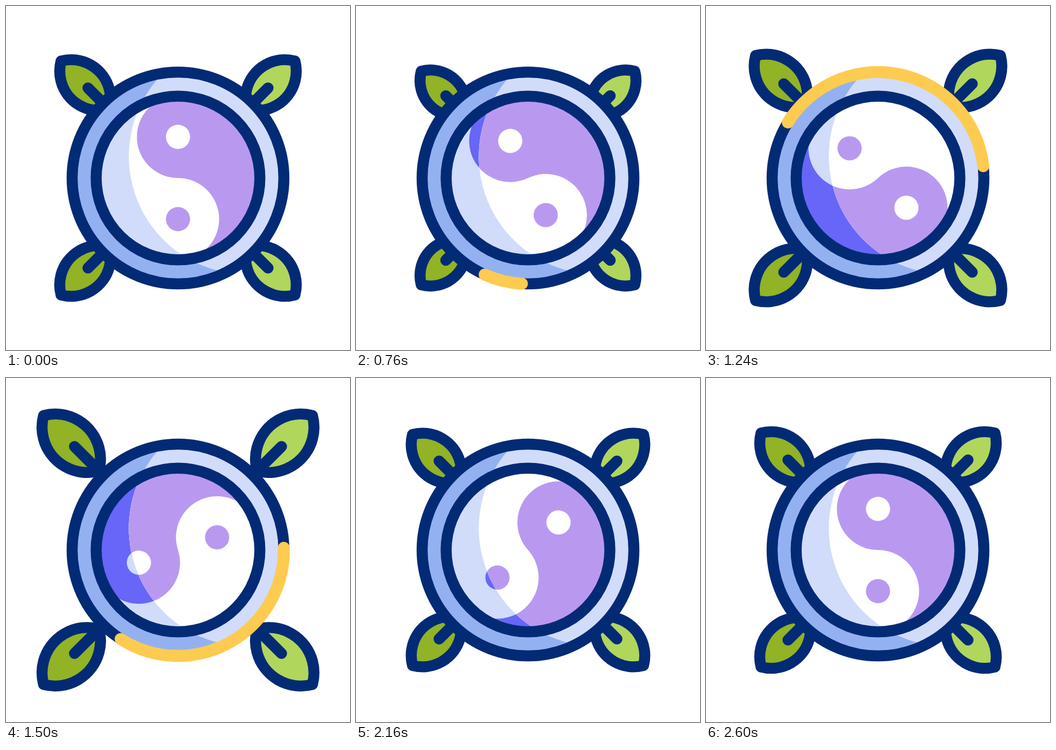
An HTML page with a canvas that plays this animation: 640 px wide and 640 px high, repeating every 3 s.

```html
<!DOCTYPE html>
<html lang="en">
<head>
<meta charset="utf-8">
<title>Yin yang</title>
<style>
  html, body { margin: 0; width: 100%; height: 100%; overflow: hidden; background: #fff; }
  canvas { display: block; width: 640px; height: 640px; }
</style>
</head>
<body>
<canvas id="stage" width="640" height="640"></canvas>
<script>
const ctx = document.getElementById('stage').getContext('2d');
const LOOP = 3000;
const TAU = Math.PI * 2;
const RAD = Math.PI / 180;
const LINE = 20.5;
const NAVY = '#032b75', YELLOW = '#fdcb50';
const SHADE = { rim: '#93b1f1', yang: '#d1dcfa', yin: '#6766f8' };
const LIT = { rim: '#d1dcfa', yang: '#ffffff', yin: '#b999f0' };

// Steps of [time in ms, value], eased in between.
const TRACKS = {
  spin: [[200, 0], [600, -40], [2100, 410], [2600, 360]],
  leaf: [[200, 1], [800, 0.912], [1667, 1.175], [1850, 1.175], [2270, 0.95], [2600, 1]],
  head: [[600, 0], [1700, 360]],
  tail: [[900, 0], [2000, 360]],
  turn: [[600, 180], [2000, 270]]
};

function valueAt(track, t) {
  if (t <= track[0][0]) return track[0][1];
  for (let i = 1; i < track.length; i++) {
    const [t0, a] = track[i - 1], [t1, b] = track[i];
    if (t < t1) {
      const p = (t - t0) / (t1 - t0);
      return a + (b - a) * p * p * (3 - 2 * p);
    }
  }
  return track[track.length - 1][1];
}

function disc(x, y, r, color) {
  ctx.beginPath();
  ctx.arc(x, y, r, 0, TAU);
  ctx.fillStyle = color;
  ctx.fill();
}

function stroke(color, width) {
  ctx.strokeStyle = color;
  ctx.lineWidth = width;
  ctx.stroke();
}

function ring(r) {
  ctx.beginPath();
  ctx.arc(0, 0, r, 0, TAU);
  stroke(NAVY, LINE);
}

// Lens of two arcs on the diagonal; the line width does not scale.
function leaf(sx, sy, scale, color) {
  const tip = -217.5 * scale, base = -127.8 * scale, r = 73.3 * scale;
  const cx = -198.7 * scale, cy = -146.7 * scale;
  const from = Math.atan2(tip - cy, tip - cx), to = Math.atan2(base - cy, base - cx);
  ctx.save();
  ctx.scale(sx, sy);
  ctx.beginPath();
  ctx.arc(cx, cy, r, from, to);
  ctx.arc(cy, cx, r, Math.PI / 2 - to, Math.PI / 2 - from);
  ctx.closePath();
  ctx.fillStyle = color;
  ctx.fill();
  stroke(NAVY, LINE);
  ctx.beginPath();
  ctx.moveTo(-167.5 * scale, -167.5 * scale);
  ctx.lineTo(base, base);
  stroke(NAVY, LINE);
  ctx.restore();
}

function medallion(colors, spin) {
  const R = 153, h = R / 2, q = Math.PI / 2;
  disc(0, 0, 197, colors.rim);
  disc(0, 0, R, colors.yang);
  ctx.save();
  ctx.rotate(spin * RAD);
  ctx.beginPath();
  ctx.arc(0, 0, R, -q, q);
  ctx.arc(0, h, h, q, -q, true);
  ctx.arc(0, -h, h, q, 3 * q);
  ctx.fillStyle = colors.yin;
  ctx.fill();
  disc(0, -h, 22.5, colors.yang);
  disc(0, h, 22.5, colors.yin);
  ctx.restore();
}

function draw(t) {
  const now = name => valueAt(TRACKS[name], t);
  const spin = now('spin'), size = now('leaf');

  ctx.setTransform(1, 0, 0, 1, 0, 0);
  ctx.fillStyle = '#fff';
  ctx.fillRect(0, 0, 640, 640);
  ctx.translate(320, 320);
  ctx.lineCap = ctx.lineJoin = 'round';

  for (const sy of [1, -1]) {
    leaf(1, sy, size, '#91b325');
    leaf(-1, sy, size, '#b1d65c');
  }

  medallion(SHADE, spin);
  ctx.save();
  ctx.beginPath();
  ctx.arc(128, -40.5, 219.5, 0, TAU);
  ctx.clip();
  medallion(LIT, spin);
  ctx.restore();
  ring(152.3);
  ring(197);

  const head = now('head'), tail = now('tail');
  if (head > tail) {
    const turn = now('turn') - 90;
    ctx.beginPath();
    ctx.arc(0, 0, 197, (tail + turn) * RAD, (head + turn) * RAD);
    stroke(YELLOW, 22.3);
  }
}

const start = performance.now();
function tick() {
  draw((performance.now() - start) % LOOP);
  requestAnimationFrame(tick);
}
tick();
</script>
</body>
</html>
```
